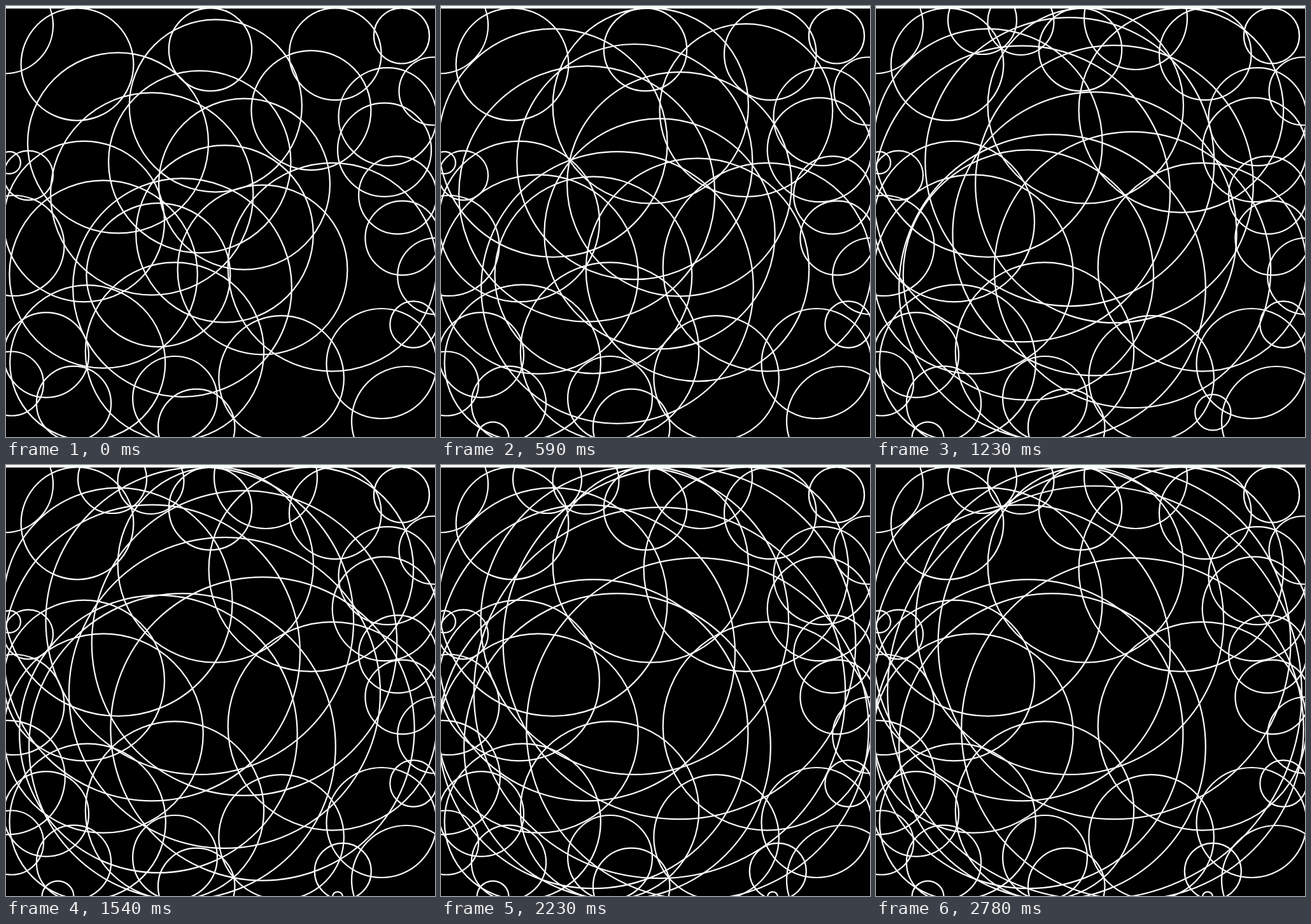
Animation of 674x678 px, one loop 3320 ms. Source, as an HTML page with a canvas:

```html
<!DOCTYPE html>
<html lang="en">
<head>
<meta charset="utf-8">
<title>Growing circles</title>
<style>
  html, body { margin: 0; width: 100%; height: 100%; overflow: hidden; background: #f7fdf9; }
  canvas { display: block; }
</style>
</head>
<body>
<canvas id="stage" width="674" height="678"></canvas>
<script>
const ctx = document.getElementById('stage').getContext('2d');
const LOOP = 3320;
const LAST_STEP = 36;
const TICKS_PER_STEP = 4.9;
const GROWTH = 1.074;
const WALL = { left: -3.6, top: 3.3, right: 676.5, bottom: 683.8 };

// Already as large as the walls allow: x, y
const settled = [
  [112, 91.7], [321, 68.5], [517.3, 75.6], [621.5, 46.9],
  [599.5, 174.2], [615.3, 297.5], [639.9, 501], [590, 562.5],
  [512.6, 410.7], [432.6, 585.5], [265.5, 617.4], [265, 543.6],
  [106.5, 625.2], [63.2, 549], [122.7, 339], [35.2, 266.5]
];

// Growing until they touch a wall: x, y, first radius, step of birth
const growing = [
  [176, 215.4, 142], [329.3, 157, 135.6], [304.3, 245.1, 143.2], [229.2, 295.5, 159.2],
  [374.5, 280.2, 134.5], [479.4, 164.1, 94], [343.5, 358.4, 139.3], [403, 415, 133.4],
  [277, 443, 171.9], [239.4, 423.2, 113], [153.1, 422, 147.7], [594.6, 226.3, 73.6],
  [128.2, 561.1, 122], [529.3, 639.3, 12, 13]
];

// Born across a wall, so they never grow: x, y, radius
const crossing = [
  [-2, 30.3, 76], [671, 134, 53.5], [622.8, 365, 58.4], [675.2, 425, 60], [629, 653, 86],
  [299.2, 663, 60.3], [8.5, 594, 50.5], [12.5, 377, 79], [5.5, 246.5, 17.4]
];
const latecomers = [
  [81.5, 679.3, 25], [227.5, 25, 52], [167, 22, 54],
  [408, 19, 81], [3, 491.6, 89.8], [521, 679.3, 8]
];
const birthStep = i => 8 + 2.35 * i;

// Eight opening steps, then bursts of seven with a short pause between them.
function stepAt(time) {
  if (time < 675) return Math.min(8, Math.floor((time + 10) / 74));
  const burst = Math.floor((time - 675) / 547);
  const inside = Math.floor((time - 675 - 547 * burst) / 76);
  return Math.min(LAST_STEP, 9 + 7 * burst + Math.min(6, inside));
}

const ticksAt = step => Math.floor(TICKS_PER_STEP * step + 1e-6);
const room = (x, y) =>
  Math.min(x - WALL.left, y - WALL.top, WALL.right - x, WALL.bottom - y);

function ring(x, y, r) {
  ctx.beginPath();
  ctx.arc(x, y, r, 0, Math.PI * 2);
  ctx.stroke();
}

function draw(time) {
  const step = stepAt(time);
  ctx.fillStyle = '#f7fdf9';
  ctx.fillRect(0, 0, 674, 4);
  ctx.fillStyle = '#000';
  ctx.fillRect(0, 4, 674, 674);

  ctx.save();
  ctx.beginPath();
  ctx.rect(0, 4, 674, 674);
  ctx.clip();
  ctx.strokeStyle = '#fff';
  ctx.lineWidth = 2.2;
  for (const [x, y] of settled) ring(x, y, room(x, y));
  for (const [x, y, r, birth = 0] of growing) {
    if (step < birth) continue;
    const grown = r + GROWTH * (ticksAt(step) - ticksAt(birth));
    ring(x, y, Math.min(grown, room(x, y)));
  }
  for (const circle of crossing) ring(...circle);
  latecomers.forEach((circle, i) => {
    if (step >= birthStep(i)) ring(...circle);
  });
  ctx.restore();
}

const start = performance.now();
function frame() {
  draw((performance.now() - start) % LOOP);
  requestAnimationFrame(frame);
}
frame();
</script>
</body>
</html>
```
